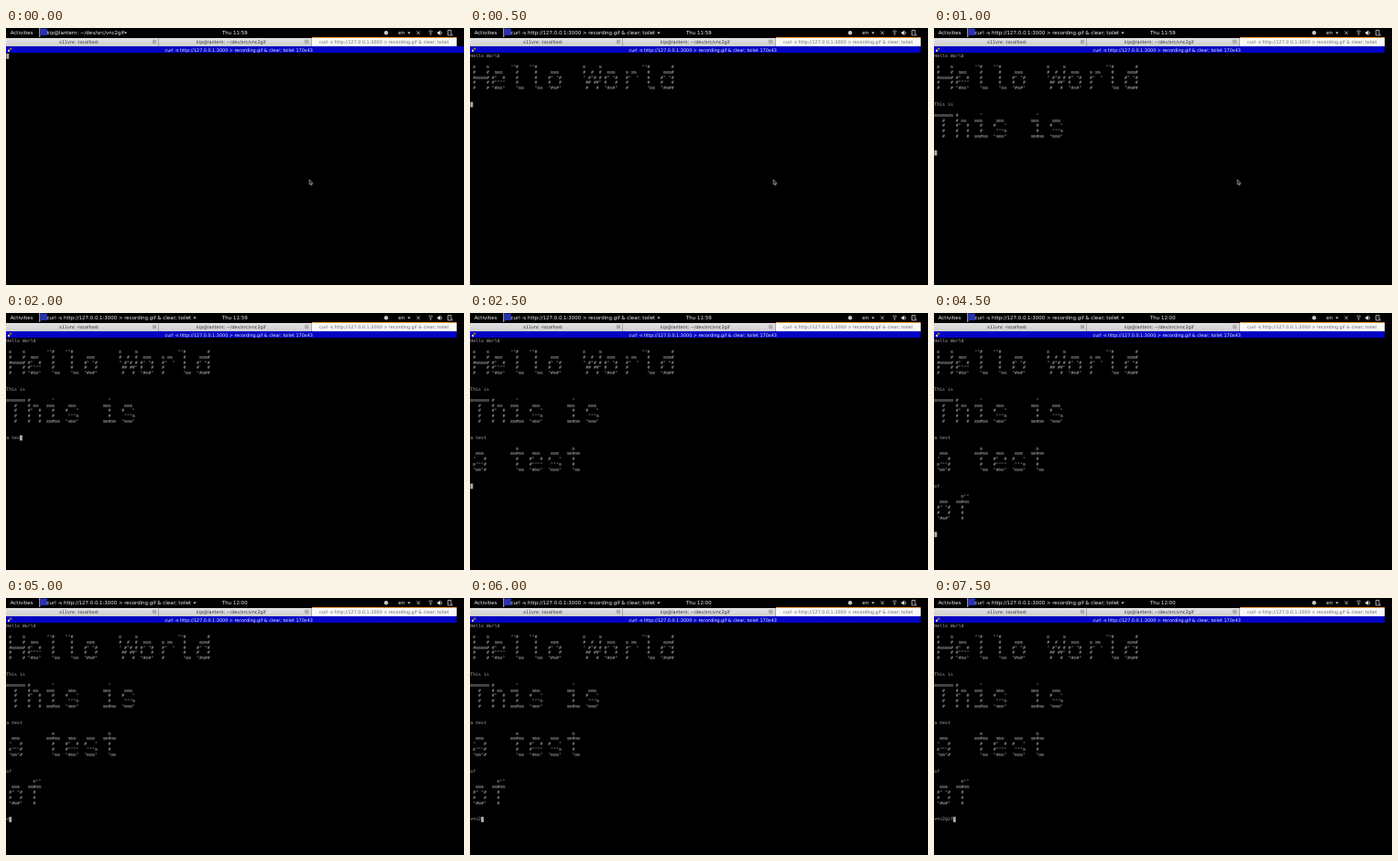
An HTML page that plays this animation: 500x281 px, repeating every 8 s.

```html
<!DOCTYPE html>
<html lang="en">
<head>
<meta charset="utf-8">
<title>Terminal banners</title>
<style>
html, body { margin: 0; width: 100%; height: 100%; overflow: hidden; background: #000; }
svg { display: block; width: 500px; height: 281px; }
text { white-space: pre; text-rendering: geometricPrecision; font-family: "DejaVu Sans", sans-serif; font-size: 4.88px; }
.panel text { font-size: 5.45px; fill: #f2f2f2; }
.tabs text { fill: #333; }
.tabs .active { fill: #666; }
.term text { font-family: "DejaVu Sans Mono", monospace; font-size: 4.864px; fill: #aaa; }
</style>
</head>
<body>
<svg viewBox="0 0 500 281">
  <defs>
    <linearGradient id="tab" x2="0" y2="1">
      <stop stop-color="#e2e2e2"/><stop offset="1" stop-color="#cfcfcf"/>
    </linearGradient>
    <path id="arrow" d="M-1.7-.9H1.7L0 1.1Z" fill="#ddd"/>
    <path id="close" d="M-1.7-1.7H1.7V1.7H-1.7ZM-1-1L1 1M1-1L-1 1" fill="none" stroke="#777" stroke-width=".5"/>
  </defs>
  <rect width="500" height="281"/>

  <g class="panel">
    <text x="4.7" y="7.3">Activities</text>
    <rect x="36.3" width="1" height="10" fill="#ccc"/>
    <rect x="37.5" y=".5" width="7.5" height="7.5" fill="#2632b4"/>
    <text id="title" x="44.5" y="7.3"></text>
    <use id="menu" href="#arrow" y="5.5"/>
    <text id="clock" x="236" y="7.3"></text>
    <circle cx="415" cy="5.2" r="2.2" fill="#c4c4c4"/>
    <text x="428.3" y="7.3">en</text>
    <use href="#arrow" x="440" y="5.5"/>
    <g fill="none" stroke="#ddd" stroke-width=".7">
      <path d="M448.5 3.5L452 7M452 3.5L448.5 7"/>
      <path d="M461.3 4Q463.6 1.7 465.9 4M462.2 5.5Q463.6 4.3 465 5.5M463.6 6V8"/>
      <path d="M475.3 4Q476.3 5.3 475.3 6.8"/>
      <path d="M482.5 2.5H486V8H482.5ZM487 6.5V8.5"/>
    </g>
    <path d="M471 4.2H472.3L474.3 2.5V8.1L472.3 6.4H471Z" fill="#ddd"/>
  </g>

  <g class="tabs">
    <rect y="11" width="334" height="9" fill="url(#tab)"/>
    <path d="M166.5 11V20M333.5 11V20" stroke="#888" stroke-width=".6"/>
    <rect x="334" y="11" width="158" height="9" fill="#fafafa"/>
    <rect x="334" y="10" width="158" height="1" fill="#ee9a3a"/>
    <text x="58" y="17">x11vnc -localhost</text>
    <text x="208" y="17" id="shellTab"></text>
    <text x="342" y="17" id="jobTab" class="active"></text>
    <use href="#close" x="162" y="15"/>
    <use href="#close" x="328.3" y="15"/>
  </g>

  <rect id="bar" y="20" height="7" fill="#0303c4"/>
  <path d="M2 23.8H4V25.8H2Z" fill="#e8d9a0"/>
  <path d="M4.2 21.6H6.2V23.6H4.2Z" fill="#d87830"/>
  <text id="caption" x="173.5" y="25.5" fill="#f0f0f0"></text>

  <g class="term" id="term"></g>
  <rect id="cursor" width="2.93" height="5.8" fill="#aaa"/>
  <path id="pointer" d="M331.2 165.8V171.2L332.4 170.2L333.3 172.1L334.2 171.7L333.3 169.9H335Z" fill="#111" stroke="#ddd" stroke-width=".55"/>
</svg>
<script>
const LOOP = 8000, COL = 2.928, ROW = 5.87, LEFT = 0.35, TOP = 28, BASE = 4.1, BLOCK = 9;
const shell = 'kip@lantern: ~/dev/src/vnc2gif';
const job = 'curl -s http://127.0.0.1:3000 > recording.gif & clear; toilet';
const lines = ['Hello World', 'This is', 'a test', 'of'];

// Banner letters: five rows, each seven columns wide.
const glyphs = {
  ' ': '////',
  H: ' m    m/ #    #/ #mmmm#/ #    #/ #    #',
  W: 'm     m/#  #  #/" #"# #/ ## ##"/ #   #',
  T: 'mmmmmmm/   #/   #/   #/   #',
  a: '/  mmm/ "   #/ m"""#/ "mm"#',
  d: '     #/  mmm#/ #" "#/ #   #/ "#m##',
  e: '/  mmm/ #"  #/ #""""/ "#mm"',
  f: '   m""/ mm#mm/   #/   #/   #',
  h: ' #/ # mm/ #"  #/ #   #/ #   #',
  i: '   "/ mmm/   #/   #/ mm#mm',
  l: ' ""#/   #/   #/   #/   "mm',
  o: '/  mmm/ #" "#/ #   #/ "#m#"',
  r: '/  m mm/  #"  "/  #/  #',
  s: '/  mmm/ #   "/  """m/ "mmm"',
  t: '   m/ mm#mm/   #/   #/   "mm'
};

// [start ms, finished banners, text being typed]
const steps = [
  [0, 0, ''], [500, 1, ''], [1000, 2, ''], [1500, 2, 'a'], [2000, 2, 'a tes'],
  [2500, 3, ''], [3000, 3, 'o'], [3500, 3, 'of '], [4500, 4, ''], [5000, 4, 'v'],
  [5500, 4, 'vn'], [6000, 4, 'vnc2'], [7000, 4, 'vnc2gi'], [7500, 4, 'vnc2gif']
];

const el = id => document.getElementById(id);
const term = el('term');
const show = (node, on) => node.setAttribute('visibility', on ? 'visible' : 'hidden');

function addText(parent, row, content) {
  const node = document.createElementNS('http://www.w3.org/2000/svg', 'text');
  node.setAttribute('x', LEFT);
  node.setAttribute('y', TOP + row * ROW + BASE);
  node.textContent = content;
  parent.append(node);
  return node;
}

const banners = lines.map((line, n) => {
  const group = document.createElementNS('http://www.w3.org/2000/svg', 'g');
  term.append(group);
  addText(group, n * BLOCK, line);
  for (let r = 0; r < 5; r++) {
    const art = [...line].map(c => glyphs[c].split('/')[r].padEnd(7)).join('');
    addText(group, n * BLOCK + 2 + r, art);
  }
  return group;
});
const typedText = addText(term, 0, '');

el('shellTab').textContent = shell;
el('jobTab').textContent = job;
el('caption').textContent = job + ' 170x43';

function draw(t) {
  const [, done, typed] = steps.findLast(step => step[0] <= t);
  const starting = t < 500;
  banners.forEach((group, n) => show(group, n < done));
  const top = TOP + done * BLOCK * ROW;
  typedText.textContent = typed;
  typedText.setAttribute('y', top + BASE);
  el('cursor').setAttribute('x', LEFT + typed.length * COL);
  el('cursor').setAttribute('y', top);
  el('title').textContent = starting ? shell : job;
  el('menu').setAttribute('x', starting ? 130.5 : 206);
  el('bar').setAttribute('width', starting ? 500 : 492);
  el('clock').textContent = t < 3000 ? 'Thu 11:59' : 'Thu 12:00';
  show(el('pointer'), t < 2000);
}

function tick() {
  draw(performance.now() % LOOP);
  requestAnimationFrame(tick);
}
tick();
</script>
</body>
</html>
```
